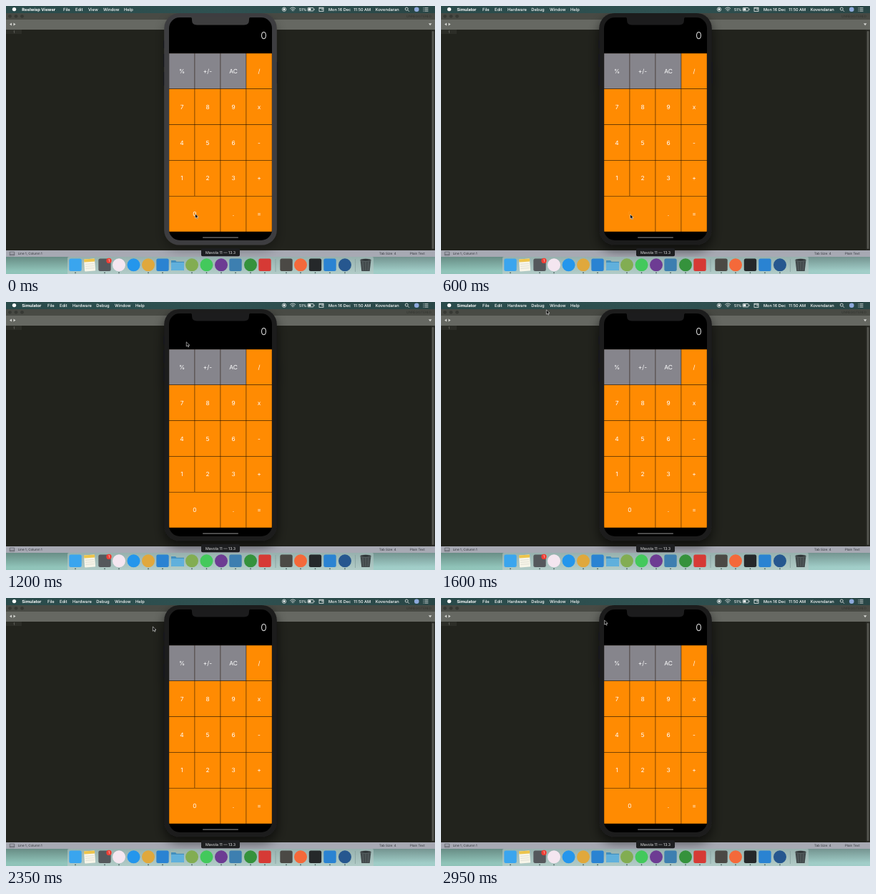
Recreate the animation shown at these times as an HTML page. Size 600 px wide and 374 px high, loop 3000 ms.

```html
<!DOCTYPE html>
<html lang="en">
<head>
<meta charset="utf-8">
<title>Calculator demo</title>
<style>
  html, body { margin: 0; width: 100%; height: 100%; overflow: hidden; background: #9cc7bf; }
  svg { display: block; width: 600px; height: 374px; }
  text { font-family: Inter, Roboto, sans-serif; text-rendering: geometricPrecision; }
  .bar { font-size: 5.8px; font-weight: 500; fill: #fff; }
  .clock { font-size: 5.6px; }
  .bold { font-weight: 700; }
  .status { font-size: 4.5px; fill: #33343b; }
  .key { font-size: 8.4px; fill: #fff; text-anchor: middle; }
</style>
</head>
<body>
<svg viewBox="0 0 600 374">
  <defs>
    <linearGradient id="menu"><stop stop-color="#294a4a"/><stop offset=".5" stop-color="#2f5151"/><stop offset="1" stop-color="#294646"/></linearGradient>
    <linearGradient id="desk"><stop stop-color="#8fc3b8"/><stop offset="1" stop-color="#a2cec9"/></linearGradient>
    <linearGradient id="edge" x2="0" y2="1"><stop stop-opacity=".28"/><stop offset="1" stop-opacity="0"/></linearGradient>
    <linearGradient id="shelf" x2="0" y2="1"><stop stop-color="#97b1ae"/><stop offset="1" stop-color="#b2ccc8"/></linearGradient>
    <filter id="shadow" x="-30%" y="-15%" width="160%" height="130%"><feDropShadow id="drop" dx="0" dy="7" stdDeviation="8"/></filter>
    <clipPath id="screen"><rect x="228" y="16" width="144" height="311" rx="15"/></clipPath>
  </defs>

  <!-- desktop and editor -->
  <rect width="600" height="374" fill="url(#desk)"/>
  <rect y="350" width="600" height="20" fill="url(#edge)"/>
  <rect y="10" width="600" height="331" fill="#22231d"/>
  <rect y="10" width="600" height="9.5" fill="#484a44"/>
  <g fill="#373934"><circle cx="5.5" cy="14.3" r="2.4"/><circle cx="14" cy="14.3" r="2.4"/><circle cx="22.5" cy="14.3" r="2.4"/></g>
  <text x="560" y="16" font-size="4.6" fill="#323430">UNREGISTERED</text>
  <rect y="19" width="600" height="14" fill="#666862"/>
  <path d="M8 23.6v4l-3-2zM10.5 23.6v4l3-2zM591 24.3h4.4l-2.2 3z" fill="#d5d6d2"/>
  <rect y="33" width="22" height="6" fill="#2c2d27"/>
  <text x="10.5" y="38" font-size="4.8" fill="#8f908a">1</text>
  <rect x="594.5" y="33" width="5.5" height="308" fill="#2b2c27"/>
  <rect x="595.8" y="35" width="2.6" height="304" rx="1.3" fill="#555650"/>
  <rect y="341" width="600" height="9" fill="#a7a9b3"/>
  <path d="M5.3 343.2h6.4v4.8h-6.4zM5.3 346.4h6.4" fill="none" stroke="#55565e" stroke-width=".7"/>
  <g class="status">
    <text x="16.7" y="347.2">Line 1, Column 1</text>
    <text x="522" y="347.2">Tab Size: 4</text>
    <text x="565" y="347.2">Plain Text</text>
  </g>

  <!-- phone -->
  <g filter="url(#shadow)">
    <path d="M220.8 48v11M220.8 67v18M220.8 92v19M379.2 78v30" stroke="#15161a" stroke-width="1.6"/>
    <rect class="bezel" x="221.2" y="10" width="157.6" height="323.6" rx="21"/>
  </g>
  <g clip-path="url(#screen)">
    <rect x="228" y="16" width="144" height="311"/>
    <g id="keys"></g>
  </g>
  <path class="bezel" d="M257 15.5h86q-3 0-3 3v1q0 7-7 7h-66q-7 0-7-7v-1q0-3-3-3z"/>
  <text x="364.8" y="46.3" font-size="13.7" font-weight="300" fill="#fff" text-anchor="end">0</text>
  <rect x="275" y="322.5" width="50" height="1.2" rx=".6" fill="#777"/>

  <!-- menu bar -->
  <rect width="600" height="10" fill="url(#menu)"/>
  <circle cx="11.5" cy="4.6" r="2.7" fill="#fff"/>
  <g id="menus" class="bar"></g>
  <g fill="none" stroke="#fff" stroke-width=".7">
    <circle cx="389" cy="4.7" r="2.7"/>
    <path d="M397.3 3.7q3.9-3.4 7.8 0M398.6 5.2q2.6-2.2 5.2 0M399.9 6.7q1.3-1 2.6 0"/>
    <rect x="422" y="2.5" width="8" height="4.4" rx=".8"/>
    <rect x="438" y="2.2" width="6" height="5.2"/>
    <path d="M438 3.2h6M441 5h3M431.2 3.8v1.8"/>
    <circle cx="560.3" cy="4.1" r="2"/><path d="M561.8 5.6l2.2 2.2"/>
    <path d="M583.5 2.7h1M583.5 4.9h1M583.5 7.1h1M585.5 2.7h5M585.5 4.9h5M585.5 7.1h5"/>
  </g>
  <circle cx="389" cy="4.7" r="1.4" fill="#fff"/>
  <rect x="422.8" y="3.3" width="3.6" height="2.8" fill="#fff"/>
  <circle cx="574.3" cy="4.8" r="3.3" fill="#8da9dc"/>
  <g class="bar clock">
    <text x="410" y="6.8" font-size="5.2">51%</text>
    <text x="451" y="6.9">Mon 16 Dec</text>
    <text x="486.3" y="6.9">11:50 AM</text>
    <text x="516.7" y="6.9" font-size="5.8">Kovendaran</text>
  </g>

  <!-- dock -->
  <path d="M86 374v-22q0-2 2-2h424q2 0 2 2v22z" fill="url(#shelf)"/>
  <path d="M377 353v18M488.5 353v18" stroke="#839d9b" stroke-width=".7"/>
  <g id="dock"></g>
  <rect x="273" y="338" width="54" height="11.3" rx="2" fill="#1d1e20"/>
  <text x="300" y="345.6" font-size="5.3" fill="#e6e6e6" text-anchor="middle">Mavola 11 — 13.3</text>

  <path id="cursor" d="M0 0v6.2l1.5-1.3 1 2.2 1.1-.5-1-2.1h2z" fill="#000" stroke="#fff" stroke-width=".55"/>
</svg>
<script>
const $ = id => document.getElementById(id);

const menuBar = (id, title, items) => `<g id="${id}"><text class="bold" x="22.3" y="6.9">${title}</text>` +
  items.map(([x, s]) => `<text x="${x}" y="6.9">${s}</text>`).join('') + '</g>';
$('menus').innerHTML =
  menuBar('viewer', 'Reelwisp Viewer', [[80, 'File'], [97, 'Edit'], [115, 'View'], [136, 'Window'], [165, 'Help']]) +
  menuBar('simulator', 'Simulator', [[58, 'File'], [75, 'Edit'], [93, 'Hardware'], [126.3, 'Debug'], [152, 'Window'], [181, 'Help']]);

// Keypad: rows of labels, the zero key spans two columns
const rows = [['%', '+/-', 'AC', '/'], ['7', '8', '9', 'x'], ['4', '5', '6', '-'], ['1', '2', '3', '+'], ['0', '.', '=']];
const rowH = 49.8;
rows.forEach((row, r) => {
  let x = 228;
  row.forEach((label, c) => {
    const w = label === '0' ? 72 : 36, y = 66 + r * rowH;
    const fill = r === 0 && c < 3 ? '#86858c' : '#ff8b02';
    $('keys').innerHTML += `<rect x="${x}" y="${y}" width="${w}" height="${rowH}" fill="${fill}" stroke="#201204" stroke-width=".4"/>
      <text class="key" ${label === '0' ? 'id="zero"' : ''} x="${x + w / 2}" y="${y + 28}">${label}</text>`;
    x += w;
  });
});

// Dock: centre, shape (c circle, s square), colour, running
const icons = [
  [97, 's', '#3aa5ee', 1], [138, 's', '#55585c', 1], [158, 'c', '#f4e6f0', 1], [178.5, 'c', '#2496ec'],
  [199, 'c', '#e0a83c', 1], [219, 's', '#2a83d2', 1], [260, 'c', '#82ad52', 1], [280.5, 'c', '#43c95c', 1],
  [301, 'c', '#6d3c93', 1], [321, 's', '#3d7fb0', 1], [342, 'c', '#35923c', 1], [362, 's', '#d63a35', 1],
  [392, 's', '#4b4945', 1], [412, 'c', '#f4693a', 1], [432.5, 's', '#25282a', 1], [453, 's', '#2a83d2', 1],
  [474, 'c', '#26578f', 1]
];
$('dock').innerHTML = icons.map(([x, shape, color, running]) =>
  (shape === 'c' ? `<circle cx="${x}" cy="361.3" r="9" fill="${color}"/>`
    : `<rect x="${x - 8.7}" y="352.6" width="17.4" height="17.4" rx="2.5" fill="${color}"/>`) +
  (running ? `<circle cx="${x}" cy="372.2" r=".8" fill="#28393a"/>` : '')).join('') + `
  <g transform="rotate(-4 117 361)"><rect x="109.5" y="353" width="15" height="17" rx="1" fill="#f7f5e9"/><rect x="109.5" y="353" width="15" height="4" fill="#edc44b"/><path d="M111 360h12M111 363h12M111 366h12" stroke="#cfcdc2" stroke-width=".5"/></g>
  <path d="M231 355h6l1.5 1.7h10.5v12.3h-18z" fill="#438fbd"/><rect x="231" y="358" width="18" height="11" rx="1" fill="#60b0dc"/>
  <path d="M495.5 354h15l-1.8 16h-11.4z" fill="#42494b"/><ellipse cx="503" cy="354.4" rx="7.5" ry="1.6" fill="#252a2c" stroke="#7b8586" stroke-width=".6"/><path d="M499 357l.8 12M503 357v12M507 357l-.8 12" stroke="#697274" stroke-width=".6"/>
  <circle cx="144" cy="355.4" r="3.7" fill="#ee3f36"/><text x="144" y="357.2" font-size="5" fill="#fff" text-anchor="middle">1</text>`;

// Pointer path: time, x, y
const path = [[0, 264.6, 290], [400, 264.6, 290.8], [800, 264.6, 290.8], [1200, 252.3, 56],
  [1600, 147.5, 11], [1950, 112.7, 4], [2350, 205.3, 40], [2950, 228.6, 31], [3000, 229, 31]];
const slope = (i, k) => (path[i + 1][k] - path[i][k]) / (path[i + 1][0] - path[i][0]);
// Harmonic mean of neighbouring slopes: smooth, without overshoot
const tangent = (i, k) => {
  if (i === 0 || i === path.length - 1) return 0;
  const a = slope(i - 1, k), b = slope(i, k);
  return a * b > 0 ? 2 * a * b / (a + b) : 0;
};
function along(t, k) {
  let i = 0;
  while (i < path.length - 2 && t >= path[i + 1][0]) i++;
  const d = path[i + 1][0] - path[i][0], u = (t - path[i][0]) / d, v = 1 - u;
  return v * v * (1 + 2 * u) * path[i][k] + u * u * (3 - 2 * u) * path[i + 1][k] +
    d * u * v * (v * tangent(i, k) - u * tangent(i + 1, k));
}

const bezels = document.querySelectorAll('.bezel');
const ramp = (t, from, to) => Math.min(1, Math.max(0, (t - from) / (to - from)));
const activeAt = 400, pressAt = 450;

function draw(now) {
  const t = now % 3000, active = t >= activeAt;
  $('viewer').style.display = active ? 'none' : '';
  $('simulator').style.display = active ? '' : 'none';
  bezels.forEach(b => b.setAttribute('fill', active ? '#1c1c1d' : '#3e3e3f'));
  $('drop').setAttribute('flood-opacity', active ? 0.6 : 0.3);
  $('zero').setAttribute('opacity', t < pressAt ? 1 : 0.1 + 0.9 * ramp(t, 700, 950));
  $('cursor').setAttribute('transform', `translate(${along(t, 1)} ${along(t, 2)})`);
}

const start = performance.now();
function tick() {
  draw(performance.now() - start);
  requestAnimationFrame(tick);
}
tick();
</script>
</body>
</html>
```
